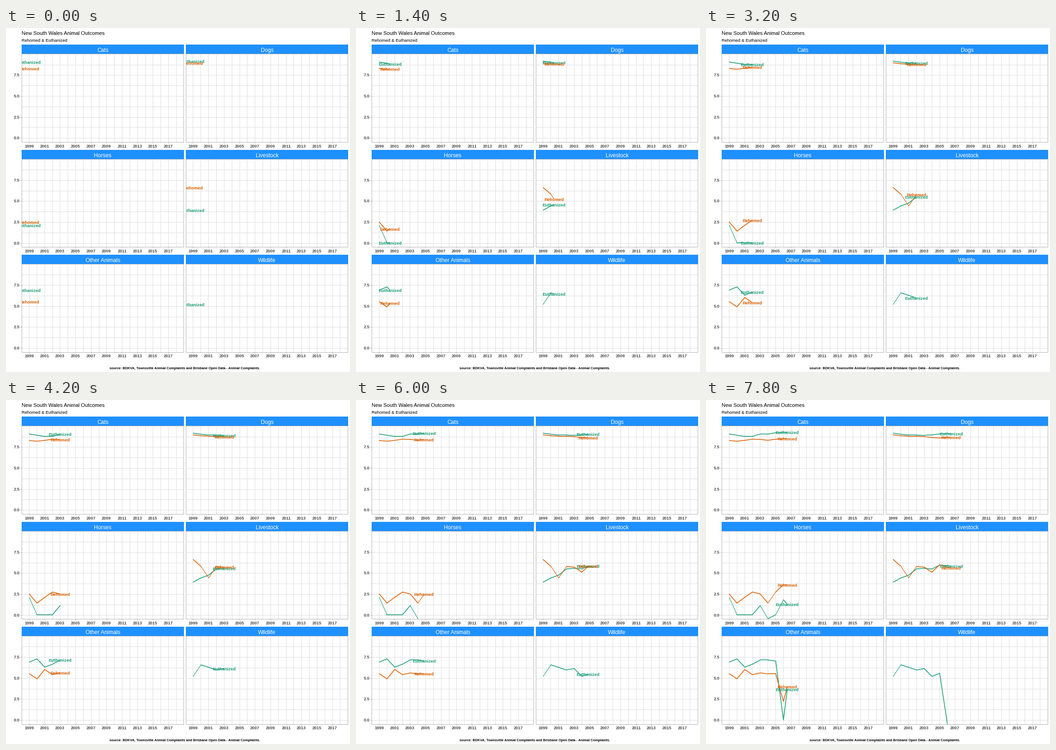
Recreate the animation shown at these times as a matplotlib script. Size 748x748 px, loop 8 s.

```python
import math

import matplotlib.pyplot as plt
from matplotlib.animation import FuncAnimation
from matplotlib.collections import LineCollection
from matplotlib.patches import Rectangle

SIZE, DPI = 748, 100
FRAMES, INTERVAL = 40, 200
YEAR_W, UNIT_H = 16.84, 18.24
PANEL_W, ROW_H = 352, 228.4
INF = math.inf
GREEN, ORANGE = "#1B9E77", "#D95F02"
GRID, BORDER, AXIS_TEXT = "#DEDEDE", "#B3B3B3", "#4D4D4D"

# log counts per year from 1999: euthanized, rehomed
DATA = {
    "Cats": ([9.02, 8.88, 8.74, 8.74, 9.02, 9.02, 9.18, 9.22, 9.31],
             [8.25, 8.17, 8.27, 8.41, 8.38, 8.28, 8.41, 8.45, 8.45]),
    "Dogs": ([9.13, 9.0, 8.9, 8.9, 8.87, 8.92, 9.04, 9.08, 9.12],
             [8.92, 8.82, 8.77, 8.77, 8.72, 8.61, 8.55, 8.64, 8.66]),
    "Horses": ([2.08, 0, 0, 0, 1.1, -INF, 0, 1.79, 0.69],
               [2.48, 1.39, 2.08, 2.71, 2.48, 1.39, 2.71, 3.58, 3.58]),
    "Livestock": ([3.89, 4.39, 4.73, 5.46, 5.54, 5.46, 5.92, 5.86, 5.75],
                  [6.58, 5.78, 4.39, 5.76, 5.68, 5.08, 5.96, 5.68, 5.5]),
    "Other Animals": ([6.88, 7.26, 6.28, 6.63, 7.13, 7.13, 7.0, 0, 7.26],
                      [5.5, 4.88, 6.0, 5.38, 5.59, 5.48, 5.48, 2.2, 5.73]),
    "Wildlife": ([5.18, 6.55, 6.25, 5.94, 6.11, 5.18, 5.54, -INF, 0], None),
}
# frame at which each year is reached: 19 years over 99 steps
KEYS = [round(k * 99 / 19) for k in range(9)]

plt.rcParams["font.family"] = "Liberation Sans"
fig = plt.figure(figsize=(SIZE / DPI, SIZE / DPI), dpi=DPI, facecolor="white")
ax = fig.add_axes([0, 0, 1, 1])
ax.set_xlim(0, SIZE)
ax.set_ylim(SIZE, 0)
ax.set_autoscale_on(False)
ax.axis("off")


def pt(px):
    return px * 72 / DPI


def mid(v):
    return math.floor(v) + 0.5


def text(x, y, s, px, color="black", weight="normal", ha="center", z=6):
    return ax.text(x, y, s, fontsize=pt(px), color=color, weight=weight,
                   ha=ha, va="baseline", zorder=z)


def rule(x0, y0, x1, y1, color, z=1):
    ax.plot([x0, x1], [y0, y1], color=color, lw=pt(1), zorder=z,
            solid_capstyle="butt")


def stroke(p, q):
    slope = abs(q[1] - p[1]) / (q[0] - p[0])
    return pt(1.1 if 1.25 < slope < 3 else 1.6)


class Series:
    def __init__(self, panel, values, name, color, z):
        self.panel, self.values = panel, values
        self.lines = LineCollection([], colors=color, zorder=2 + z,
                                    capstyle="round")
        ax.add_collection(self.lines, autolim=False)
        self.label = text(0, 0, name, 9.4, color, "bold", z=4 + z)
        for art in (self.lines, self.label):
            art.set_clip_path(panel.clip)
        self.label.set_clip_on(True)

    def update(self, i):
        k = sum(key <= i for key in KEYS) - 1
        t = (i - KEYS[k]) / (KEYS[k + 1] - KEYS[k])
        a, b = self.values[k], self.values[k + 1]
        # steps from or to minus infinity can give nan: no tip, no label
        tip = a + (b - a) * t
        pts = [self.panel.point(j, v) for j, v in enumerate(self.values[:k + 1])]
        shown = not math.isnan(tip)
        self.label.set_visible(shown)
        if shown:
            x, y = self.panel.point(k + t, tip)
            self.label.set_position((x, y + 4))
            if t:
                pts.append((x, y))
        pairs = list(zip(pts, pts[1:]))
        self.lines.set_segments(pairs)
        self.lines.set_linewidths([stroke(p, q) for p, q in pairs] or [1])
        return [self.lines, self.label]


class Panel:
    def __init__(self, n, title):
        col, row = n % 2, n // 2
        self.left = 34.5 + 356.5 * col
        self.right = self.left + PANEL_W
        self.zero = 238.6 + ROW_H * row
        self.top = self.zero - 10.02 * UNIT_H
        self.bottom = self.zero + 0.477 * UNIT_H
        l, r, t, b = map(mid, (self.left, self.right, self.top, self.bottom))
        self.clip = Rectangle((l, t), r - l, b - t, fill=False, ec=BORDER,
                              lw=pt(1), zorder=7)
        ax.add_patch(self.clip)
        ax.add_patch(Rectangle((l - 0.5, t - 19.5), r - l + 1, 20, lw=0,
                               fc="#1E90FF", zorder=8))
        text((l + r) / 2, t - 4, title, 12, "white", z=9)

        for year in range(20):
            x = mid(self.point(year, 0)[0])
            rule(x, t, x, b, GRID)
            if year % 2 == 0 and year < 19:
                rule(x, b, x, b + 3, BORDER)
                text(x - 0.3, b + 12, str(1999 + year), 9.15, AXIS_TEXT, "bold")
        for step in range(8):
            v = step * 1.25
            y = mid(self.point(0, v)[1])
            rule(l, y, r, y, GRID)
            if col == 0 and step % 2 == 0:
                rule(l - 3, y, l, y, BORDER)
                text(30, y + 3.5, f"{v:.1f}", 9.25, AXIS_TEXT, "bold", "right")

    def point(self, year, value):
        y = self.bottom if value == -INF else self.zero - value * UNIT_H
        return self.left + (year + 0.95) * YEAR_W, y


text(34, 15, "New South Wales Animal Outcomes", 11.3, ha="left")
text(34, 30, "Rehomed & Euthanized", 9.35, ha="left")
text(388.5, 742, "source: BDKVA, Townsville Animal Complaints and Brisbane "
     "Open Data - Animal Complaints.", 7.4, weight="bold")

series = []
for n, (title, (euth, rehomed)) in enumerate(DATA.items()):
    panel = Panel(n, title)
    series.append(Series(panel, euth, "Euthanized", GREEN, 0))
    if rehomed:
        series.append(Series(panel, rehomed, "Rehomed", ORANGE, 0.5))


def update(i):
    return [art for s in series for art in s.update(i)]


anim = FuncAnimation(fig, update, frames=FRAMES, interval=INTERVAL,
                     init_func=lambda: update(0), repeat=True, repeat_delay=0)
plt.show()
```
